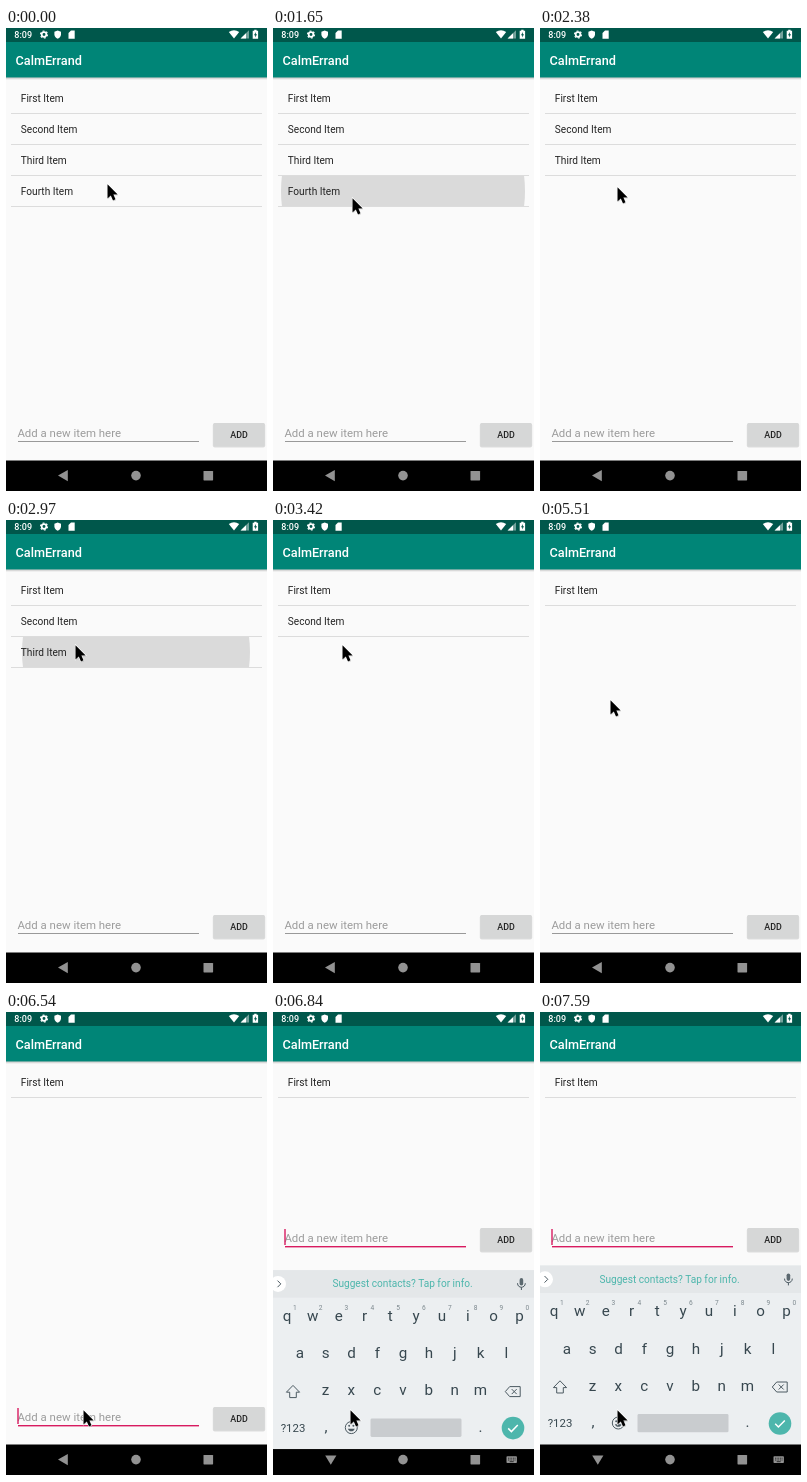
These frames come from a looping animation (261x464 px, 8 s). An HTML page:

```html
<!DOCTYPE html>
<html lang="en">
<head>
<meta charset="utf-8">
<title>To-do list</title>
<style>
html, body { margin: 0; width: 100%; height: 100%; overflow: hidden; background: #fafafa; }
svg { display: block; width: 100vw; height: 100vh; }
text { font-family: Roboto, "Noto Sans", sans-serif; }
.medium { font-weight: 500; }
.item text { font-size: 10.15px; fill: #242424; }
.item circle { fill: #dadada; r: 0; }
.keys { font-size: 15.2px; fill: #37474f; text-anchor: middle; }
.keys .digit { font-size: 6.6px; fill: #7b878d; }
.icon { fill: none; stroke: #4c5a62; stroke-width: 1; }

.anim, .item, .item circle { animation: 8s step-end -10ms infinite; }
#item2 { animation-name: gone2; }
#item3 { animation-name: gone3; }
#item4 { animation-name: gone4; }
#item2 circle { animation-name: ripple2; }
#item3 circle { animation-name: ripple3; }
#item4 circle { animation-name: ripple4; }
#pointer { animation-name: point; }
#entry { animation-name: lift; }
#line { animation-name: focus; }
#caret { animation-name: blink; }
#keyboard { animation-name: slide; }
#back { animation-name: typingOff; }
#hide { animation-name: typingOn; }

@keyframes gone4 { 0% { opacity: 1 } 26.125%, 100% { opacity: 0 } }
@keyframes gone3 { 0% { opacity: 1 } 42.75%, 100% { opacity: 0 } }
@keyframes gone2 { 0% { opacity: 1 } 59.5%, 100% { opacity: 0 } }
@keyframes ripple4 { 0% { r: 0 } 20.625% { r: 122px } 22.5%, 100% { r: 130px } }
@keyframes ripple3 { 0% { r: 0 } 37.125% { r: 114px } 39%, 100% { r: 130px } }
@keyframes ripple2 { 0% { r: 0 } 54% { r: 118px } 55.875%, 100% { r: 130px } }
@keyframes point {
  0% { transform: translate(100px, 155px) }
  13.125% { transform: translate(87px, 164px) }
  15% { transform: translate(78px, 169px) }
  29.75% { transform: translate(76px, 158px) }
  31.625% { transform: translate(71px, 135px) }
  33.375% { transform: translate(68px, 124px) }
  46.5% { transform: translate(65px, 110px) }
  48.375% { transform: translate(61px, 97px) }
  63.25% { transform: translate(58px, 81px) }
  65.125% { transform: translate(56px, 70px) }
  68.875% { transform: translate(69px, 179px) }
  70.75% { transform: translate(101px, 341px) }
  74.375% { transform: translate(86px, 380px) }
  76.25%, 100% { transform: translate(76px, 397px) }
}
@keyframes focus {
  0% { fill: #999; height: 1px }
  78.125%, 100% { fill: #d81b60; height: 1.4px }
}
@keyframes blink {
  0% { opacity: 0 }
  80% { opacity: 1 }
  89.25% { opacity: 0 }
  94.875%, 100% { opacity: 1 }
}
@keyframes lift { 0% { transform: none } 83.625%, 100% { transform: translateY(-179px) } }
@keyframes slide {
  0% { transform: translateY(30px); opacity: 0 }
  83.625% { transform: translateY(17px); opacity: .6 }
  85.5% { transform: translateY(4.6px); opacity: 1 }
  87.375%, 100% { transform: none; opacity: 1 }
}
@keyframes typingOff { 0% { opacity: 1 } 83.625%, 100% { opacity: 0 } }
@keyframes typingOn { 0% { opacity: 0 } 83.625%, 100% { opacity: 1 } }
</style>
</head>
<body>
<svg viewBox="0 0 261 464">
  <defs>
    <linearGradient id="shade" x2="0" y2="1">
      <stop stop-color="#000" stop-opacity=".22"/>
      <stop offset="1" stop-color="#000" stop-opacity="0"/>
    </linearGradient>
    <clipPath id="row"><rect x="5" y="55" width="251" height="30"/></clipPath>
  </defs>

  <rect width="261" height="464" fill="#fafafa"/>
  <rect width="261" height="14" fill="#00574b"/>
  <rect y="14" width="261" height="35.5" fill="#008577"/>
  <rect y="49.5" width="261" height="2.5" fill="url(#shade)"/>
  <text class="medium" x="9.5" y="36.8" font-size="12.7" fill="#fff">CalmErrand</text>

  <!-- status bar -->
  <g fill="#fff">
    <text class="medium" x="8.3" y="9.8" font-size="9">8:09</text>
    <circle cx="38" cy="6.5" r="2.3" fill="none" stroke="#fff" stroke-width="1.7"/>
    <circle cx="38" cy="6.5" r="3.5" fill="none" stroke="#fff" stroke-width="1.2" stroke-dasharray="1.8 1.865"/>
    <path d="M51.7 2.4l3.3 1.3v2.6c0 2-1.3 3.8-3.3 4.5-2-.7-3.3-2.5-3.3-4.5V3.7z"/>
    <path d="M65 2.5h3.7v8.2h-6.2V5z"/>
    <path d="M222.8 4q5.2-3.6 10.4 0l-5.2 6.6z"/>
    <path d="M243 2.2v8.4h-8.4z" fill-opacity=".45"/>
    <path d="M240 5.2v5.4h-5.4z"/>
    <path d="M248.2 1.8h2.4v1h1.5v8h-5.4v-8h1.5z"/>
    <path d="M249.8 4l-1.8 3.2h1.2v2.4l1.8-3.3h-1.2z" fill="#00574b"/>
  </g>

  <g id="list"></g>

  <g id="entry" class="anim">
    <text x="11.4" y="409" font-size="11.43" fill="#9c9c9c">Add a new item here</text>
    <rect id="line" class="anim" x="12" y="413" width="181" height="1"/>
    <rect id="caret" class="anim" x="11.3" y="396" width="1.4" height="16" fill="#d81b60"/>
    <rect x="206.8" y="395.6" width="52.4" height="24" rx="2" fill="#000" opacity=".12"/>
    <rect x="207.3" y="394.9" width="51.4" height="23.6" rx="1.4" fill="#d6d7d7"/>
    <text class="medium" x="233" y="409.9" font-size="8.9" fill="#222" text-anchor="middle">ADD</text>
  </g>

  <rect y="432.5" width="261" height="31" fill="#000"/>

  <g id="keyboard" class="anim">
    <rect y="253.5" width="261" height="179.5" fill="#eceff1"/>
    <rect y="253.5" width="261" height="27.5" fill="#e4e7e9"/>
    <rect y="432.5" width="261" height="31" fill="#000"/>
    <circle cx="5" cy="267.3" r="8" fill="#fff"/>
    <path class="icon" d="M4.5 264l3.3 3.3-3.3 3.3" stroke-width="1.4"/>
    <text x="129.5" y="270.9" font-size="10.15" fill="#4db6ac" text-anchor="middle">Suggest contacts? Tap for info.</text>
    <rect x="246.6" y="261.5" width="3.6" height="7.4" rx="1.8" fill="#5b686f"/>
    <path class="icon" d="M244.5 266.6c0 5.4 7.8 5.4 7.8 0M248.4 270.6v2.8"/>

    <g id="keys" class="keys"></g>
    <g class="keys">
      <text x="20" y="415" font-size="11.4">?123</text>
      <text x="53" y="415">,</text>
      <text x="207.5" y="415">.</text>
    </g>
    <path class="icon" d="M20 368.8l6.6 6.8h-3.3v5.4h-6.6v-5.4h-3.3z"/>
    <path class="icon" d="M236.7 370h10.5v10h-10.5l-4.4-5zM238.7 372.5l5 5m0-5l-5 5"/>
    <circle class="icon" cx="78.3" cy="411" r="6"/>
    <circle cx="76.2" cy="409.2" r="1" fill="#4c5a62"/>
    <circle cx="80.4" cy="409.2" r="1" fill="#4c5a62"/>
    <path d="M74.8 412.2h7c-1.2 3.4-5.8 3.4-7 0z" fill="#4c5a62"/>
    <rect x="97.5" y="402" width="91" height="18.3" rx="1.4" fill="#c9cccf"/>
    <circle cx="240" cy="411.5" r="11.3" fill="#4db6ac"/>
    <path d="M235.2 411.8l3.2 3.2 6.4-6.6" fill="none" stroke="#fff" stroke-width="1.5"/>
  </g>

  <!-- navigation bar -->
  <g fill="#929292">
    <path id="back" class="anim" d="M52 447.6l9.8-5.6v11.2z"/>
    <g id="hide" class="anim">
      <path d="M52.2 443.4h11.2l-5.6 9.4z"/>
      <rect x="233.5" y="444.2" width="10.4" height="6.8" rx=".8"/>
      <path d="M235 446.2h7.5M235 448h7.5" stroke="#000" stroke-width=".8" stroke-dasharray=".9 .75"/>
      <path d="M236.7 449.7h4" stroke="#000" stroke-width=".7"/>
    </g>
    <circle cx="130" cy="447.6" r="4.8"/>
    <rect x="197.5" y="443" width="9.6" height="9.4" rx=".6"/>
  </g>
  <rect y="463" width="261" height="1" fill="#fff"/>

  <g id="pointer" class="anim">
    <path d="M2.2 2V16.2L5.5 13.2 7.7 18.2 10.2 17.1 8.1 12.3H12.2Z" fill="#000" opacity=".22"/>
    <path d="M1.5 1.2V15.4L4.8 12.4 7 17.4 9.5 16.3 7.4 11.5H11.7Z" stroke="#fff" stroke-width="1.1" paint-order="stroke"/>
  </g>
</svg>
<script>
const byId = id => document.getElementById(id);

byId('list').innerHTML = ['First', 'Second', 'Third', 'Fourth'].map((name, i) => `
  <g transform="translate(0 ${i * 31})"><g class="item" id="item${i + 1}">
    <g clip-path="url(#row)"><circle cx="130" cy="70"/></g>
    <rect x="5" y="85" width="251" height="1" fill="#dcdcdc"/>
    <text x="14.8" y="73.8">${name} Item</text>
  </g></g>`).join('');

const rows = [['qwertyuiop', 14], ['asdfghjkl', 26.8], ['zxcvbnm', 52.5]];
const pitch = 25.83;
byId('keys').innerHTML = rows.map(([letters, left], r) =>
  [...letters].map((letter, i) => {
    const x = left + i * pitch;
    const digit = r ? '' : `<text class="digit" x="${x + 7.8}" y="293">${(i + 1) % 10}</text>`;
    return `<text x="${x}" y="${304.4 + r * 37.2}">${letter}</text>${digit}`;
  }).join('')).join('');
</script>
</body>
</html>
```
